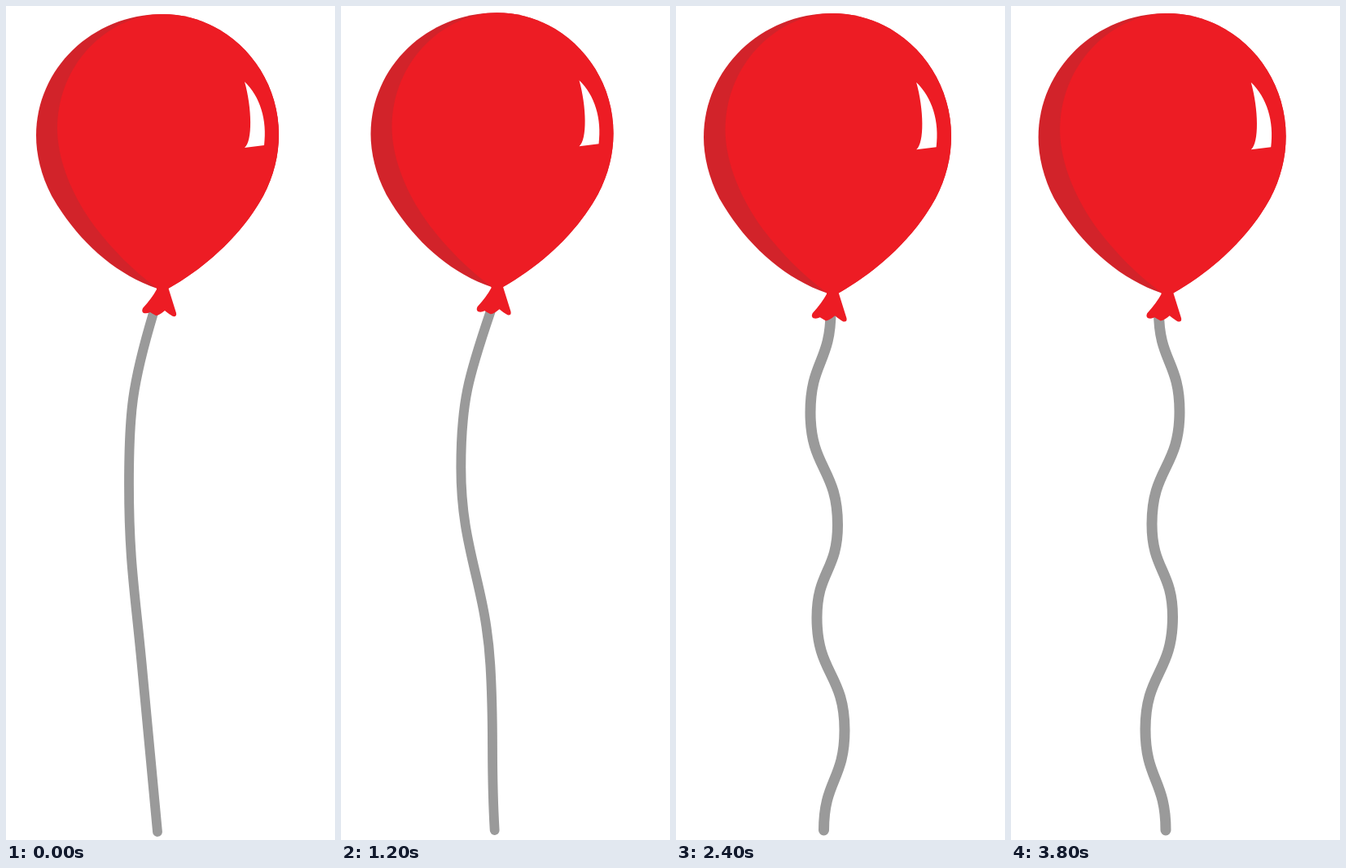
An HTML page that plays this animation: 404x1024 px, repeating every 4000 ms.

```html
<!DOCTYPE html>
<html lang="en">
<head>
<meta charset="utf-8">
<title>Balloon</title>
<style>
  html, body { margin: 0; width: 100%; height: 100%; overflow: hidden; background: #fff; }
  svg { display: block; width: 100%; height: 100%; }
</style>
</head>
<body>
<svg viewBox="0 0 404 1024">
  <path id="string" fill="none" stroke="#9a9a9a" stroke-linecap="round"/>
  <g id="balloon">
    <path fill="#d2232a" d="M186 347C130 328 85 284 56 233C43 208 37 182 37 159C37 77 106 10 192 10C271 10 335 77 335 158C335 183 329 208 316 233C292 277 250 318 199 347Z"/>
    <path fill="#ed1c24" d="M186 347C155 324 130 298 110 272C84 238 63 192 63 150C63 80 113 20 180 10.4L192 10C271 10 335 77 335 158C335 183 329 208 316 233C292 277 250 318 199 347Z"/>
    <path fill="#ed1c24" d="M185 345H199L209 377Q210 382 205 381Q201 379 195 374Q188 380 184 380Q180 378 177 376Q173 378 169 377Q166 375 168 371Q179 359 185 348Z"/>
    <path fill="#fff" d="M293 93C312 111 321 140 317 171L293 174C303 166 302 125 293 93Z"/>
  </g>
</svg>
<script>
const LOOP = 4000, STEP = 200, SWAY_STEPS = 10, SWAY_CYCLE = 5;
const TOP = 375, BOTTOM = 1012;
const string = document.getElementById('string');
const balloon = document.getElementById('balloon');

// Each string is a chain of knots; lean is the sideways slope (dx/dy) there.
const knot = (x, y, lean = 0) => ({ x, y, lean });
const gentle = [knot(181, TOP, -0.3), knot(151, 585), knot(168, 820, 0.09), knot(186, BOTTOM, 0.09)];
const curved = [knot(189, TOP, -0.42), knot(140, 530), knot(214, 787), knot(194, BOTTOM)];
const swung = [knot(191, TOP, -0.42), knot(145, 525), knot(221, 812), knot(197, BOTTOM, -0.14)];
const wave = [knot(190, TOP), knot(165, 499), knot(198.5, 637), knot(173, 751),
  knot(207, 889), knot(181.5, BOTTOM)];
const flippedWave = wave.map(k => knot(k.x, TOP + BOTTOM - k.y)).reverse();

const lerp = (a, b, t) => a + (b - a) * t;
const blend = (from, to, t) => from.map((k, i) =>
  knot(lerp(k.x, to[i].x, t), lerp(k.y, to[i].y, t), lerp(k.lean, to[i].lean, t)));

function drawString(knots, width, tension) {
  let d = `M${knots[0].x} ${knots[0].y}`;
  for (let i = 1; i < knots.length; i++) {
    const a = knots[i - 1], b = knots[i];
    const reach = (b.y - a.y) * tension;
    d += `C${a.x + a.lean * reach} ${a.y + reach} ${b.x - b.lean * reach} ${b.y - reach} ${b.x} ${b.y}`;
  }
  string.setAttribute('d', d);
  string.setAttribute('stroke-width', width);
}

function placeBalloon(dx, dy, scale) {
  balloon.setAttribute('transform', `translate(${186 + dx} ${10 + dy}) scale(${scale}) translate(-186 -10)`);
}

function drawSway(step) {
  const phase = step % SWAY_CYCLE;
  const low = phase === 0 || phase === 2;
  const pose = phase === SWAY_CYCLE - 1 ? swung : blend(gentle, curved, phase / 3);
  drawString(pose, 11.8, 0.42);
  string.setAttribute('transform', `translate(0 ${low ? 2 : 0})`);
  placeBalloon(low ? 0 : -0.5, low ? 0 : -1.7, 1);
}

function drawWave(step) {
  const flipped = step % 2 === 1;
  drawString(flipped ? flippedWave : wave, 13, 0.5);
  string.removeAttribute('transform');
  placeBalloon(flipped ? -0.4 : 0, -1, 1.02);
}

function draw(ms) {
  const step = Math.floor((ms % LOOP) / STEP);
  if (step < SWAY_STEPS) drawSway(step);
  else drawWave(step);
}

const start = performance.now();
function tick() {
  draw(performance.now() - start);
  requestAnimationFrame(tick);
}
tick();
</script>
</body>
</html>
```
